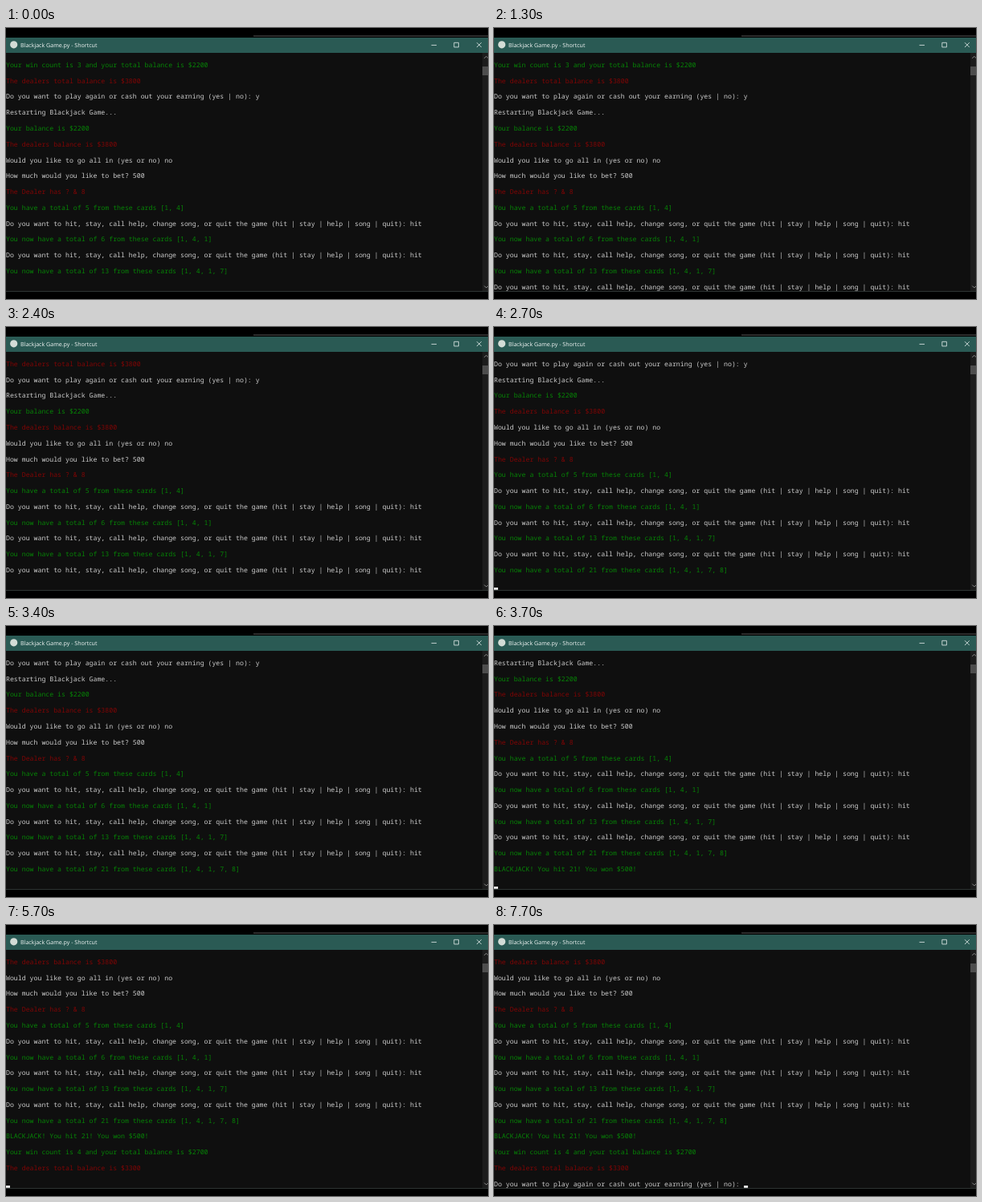
These frames come from a looping animation (600x338 px, 8000 ms). An HTML page:

```html
<!DOCTYPE html>
<html lang="en">
<head>
<meta charset="utf-8">
<title>Blackjack console</title>
<style>
  html, body { margin: 0; width: 100%; height: 100%; overflow: hidden; background: #000; }
  svg { display: block; width: 100vw; height: 100vh; }
  text { text-rendering: geometricPrecision; white-space: pre; }
  #lines { font: 8.23px "Noto Sans Mono", "DejaVu Sans Mono", monospace; }
  .title { font: 7.08px "Open Sans", "Noto Sans", sans-serif; fill: #f2f6f5; }
  .white { fill: #cccccc; }
  .green { fill: #068406; }
  .red { fill: #800505; }
  .stroke { fill: none; stroke: #e8efee; stroke-width: .8; }
  .arrow { fill: none; stroke: #8a8a8a; stroke-width: 1; }
</style>
</head>
<body>
<svg viewBox="0 0 600 338" preserveAspectRatio="none">
  <rect width="600" height="338" fill="#000"/>
  <rect x="308" y="9" width="292" height="2" fill="#2b2b2b"/>
  <rect y="12" width="600" height="19" fill="#2a5a54"/>
  <rect y="31" width="600" height="297" fill="#0f0f0f"/>
  <rect y="328" width="600" height="1" fill="#2e3433"/>

  <circle cx="9.7" cy="20.8" r="4.6" fill="#d3dcd6"/>
  <text class="title" x="18" y="23.6">Blackjack Game.py - Shortcut</text>
  <path class="stroke" d="M529.5 21.4h6.5M557.8 18.3h5.6v5.6h-5.6zM586 18.2l5.8 5.8M591.8 18.2l-5.8 5.8"/>

  <rect x="593" y="31" width="7" height="297" fill="#1c1c1c"/>
  <rect x="593" y="48" width="7" height="11" fill="#4d4d4d"/>
  <path class="arrow" d="M595.3 37.8l2.5-2.5 2.5 2.5M595.3 321.6l2.5 2.5 2.5-2.5"/>

  <g id="lines"></g>
  <rect id="cursor" y="325" width="5" height="2.8" fill="#f0f0f0"/>
</svg>
<script>
const LOOP = 8000, ROW = 19.77, BASE = 48.9, COL = 4.938;
const ASK = "Do you want to hit, stay, call help, change song, or quit the game (hit | stay | help | song | quit): ";
const AGAIN = "Do you want to play again or cash out your earning (yes | no): ";
const TYPED = 14;

const white = s => ["white", s], green = s => ["green", s], red = s => ["red", s];
const now = (total, cards) => green(`You now have a total of ${total} from these cards [${cards}]`);
const wins = (n, sum) => green(`Your win count is ${n} and your total balance is $${sum}`);
const dealer = sum => red(`The dealers total balance is $${sum}`);

const script = [
  wins(3, 2200),
  dealer(3800),
  white(AGAIN + "y"),
  white("Restarting Blackjack Game..."),
  green("Your balance is $2200"),
  red("The dealers balance is $3800"),
  white("Would you like to go all in (yes or no) no"),
  white("How much would you like to bet? 500"),
  red("The Dealer has ? & 8"),
  green("You have a total of 5 from these cards [1, 4]"),
  white(ASK + "hit"),
  now(6, "1, 4, 1"),
  white(ASK + "hit"),
  now(13, "1, 4, 1, 7"),
  white(ASK),
  now(21, "1, 4, 1, 7, 8"),
  green("BLACKJACK! You hit 21! You won $500!"),
  wins(4, 2700),
  dealer(3300),
  white(AGAIN)
];

// Each track is a list of [start time, value]; cursor values are columns, -1 hides it.
const scroll = [[0, 0], [1600, 1], [2700, 2], [3700, 3], [4700, 4], [5700, 5]];
const printed = [[0, 14], [200, 15], [2700, 16], [3700, 17], [4700, 18], [5700, 19], [7700, 20]];
const typing = [[0, ""], [800, "h"], [1300, "hit"]];
const blink = [[0, -1], [200, ASK.length], [800, -1], [1600, 0], [2400, -1], [2700, 0], [3400, -1],
  [3700, 0], [4600, -1], [4700, 0], [6600, -1], [7200, 0], [7700, AGAIN.length]];

const at = (track, t) => track.filter(([start]) => start <= t).pop()[1];

const group = document.getElementById("lines");
const cursor = document.getElementById("cursor");
const rows = script.map(([color, words]) => {
  const el = document.createElementNS("http://www.w3.org/2000/svg", "text");
  el.setAttribute("class", color);
  el.textContent = words;
  return group.appendChild(el);
});

function draw(t) {
  const first = at(scroll, t), end = at(printed, t), col = at(blink, t);
  rows.forEach((el, i) => {
    el.setAttribute("y", BASE + (i - first) * ROW);
    el.setAttribute("display", i >= first && i < end ? "inline" : "none");
  });
  rows[TYPED].textContent = ASK + at(typing, t);
  cursor.setAttribute("x", Math.max(col, 0) * COL);
  cursor.setAttribute("display", col < 0 ? "none" : "inline");
}

const origin = performance.now();
function tick() {
  draw((performance.now() - origin) % LOOP);
  requestAnimationFrame(tick);
}
tick();
</script>
</body>
</html>
```
